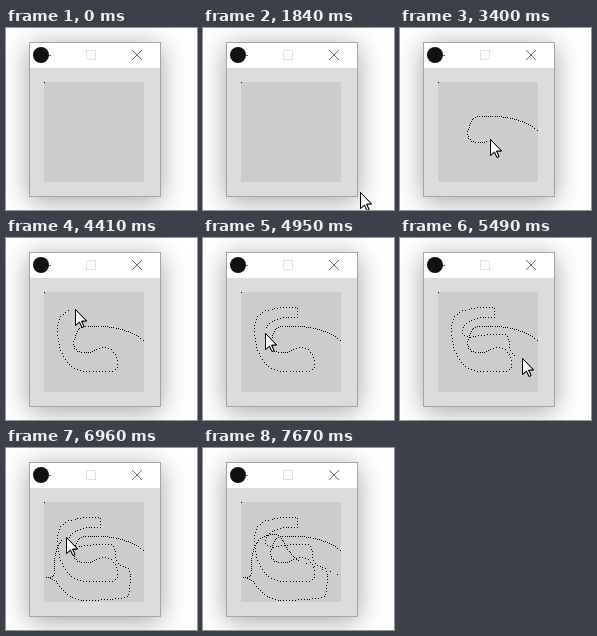
Recreate the animation shown at these times as an HTML page with a canvas. Size 191 px wide and 182 px high, loop 8.91 s.

```html
<!DOCTYPE html>
<html lang="en">
<head>
<meta charset="utf-8">
<title>Mouse trail</title>
<style>
html, body { margin: 0; width: 100%; height: 100%; overflow: hidden; background: #fff; }
canvas { display: block; }
</style>
</head>
<body>
<canvas id="stage" width="191" height="182"></canvas>
<script>
const LOOP = 8910, START = 1840, END = 7670, STEPS = 75;
const STEP = (END - START) / STEPS;
const DOT_GAP = 21 / STEP; // steps between dots
const LAG = 2 * DOT_GAP;

// Hand movement: each leg is followed at even speed up to its last step
const legs = [
  [7, 'M157 164C156 140 151 110 130 97'],
  [20, 'M130 97Q112 88 93 88H80Q71 88 70 96Q66 104 68 109Q70 114 78 114Q87 114 90 111'],
  [33, 'M90 111Q97 107 103 110Q112 116 111 127Q110 133 103 133H80Q66 133 58 120Q51 108 51 90Q51 73 69 71'],
  [47, 'M69 71Q76 69 82 69H94V79H83Q70 80 64 87Q57 97 70 99Q88 95 104 96Q110 98 109 108Q110 117 122 120'],
  [57, 'M122 120Q125 125 124 134L122 146Q121 150 112 150Q95 152 75 152Q58 148 50 133'],
  [71, 'M50 133Q46 129 39 129H45Q49 128 48 118Q48 100 56 91Q64 85 74 86Q78 88 81 95Q86 105 94 112'],
  [74, 'M94 112Q125 122 180 144']
].map(([end, d], i, all) => {
  const path = document.createElementNS('http://www.w3.org/2000/svg', 'path');
  path.setAttribute('d', d);
  return { path, end, start: i ? all[i - 1][0] : 0, length: path.getTotalLength() };
});

const ctx = document.getElementById('stage').getContext('2d');

function pointer(step) {
  const leg = legs.find(l => step <= l.end) || legs[legs.length - 1];
  const part = (step - leg.start) / (leg.end - leg.start);
  const p = leg.path.getPointAtLength(part * leg.length);
  return [Math.round(p.x), Math.round(p.y)];
}

const dots = [];
for (let step = 0; step <= 74; step += DOT_GAP) {
  const [x, y] = pointer(step);
  if (x >= 38 && x < 138 && y >= 54 && y < 154) dots.push({ step, x, y });
}

function box(color, x, y, w, h) {
  ctx.fillStyle = color;
  ctx.fillRect(x, y, w, h);
}

function line(color, points, close) {
  ctx.beginPath();
  points.forEach(([x, y]) => ctx.lineTo(x, y));
  if (close) ctx.closePath();
  ctx.strokeStyle = color;
  ctx.lineWidth = 1;
  ctx.stroke();
}

function drawWindow() {
  box('#fff', 0, 0, 191, 182);
  ctx.save();
  ctx.shadowColor = 'rgba(0,0,0,.36)';
  ctx.shadowBlur = 25;
  ctx.shadowOffsetY = 4;
  box('#a5a5a5', 23, 14, 132, 155);
  ctx.restore();
  box('#fff', 24, 15, 130, 25);
  box('#dcdcdc', 24, 40, 130, 128);
  box('#ccc', 38, 54, 100, 100);

  ctx.beginPath();
  ctx.arc(35, 27, 8, 0, Math.PI * 2);
  ctx.fillStyle = '#111';
  ctx.fill();
  box('#666', 43, 27, 2, 1);

  ctx.strokeStyle = '#e0e0e0';
  ctx.lineWidth = 1;
  ctx.strokeRect(80.5, 22.5, 9, 9);
  line('#707070', [[126, 22], [136, 32]]);
  line('#707070', [[136, 22], [126, 32]]);
}

function drawTrail(step) {
  box('#000', 38, 54, 1, 1);
  for (const dot of dots) {
    if (dot.step <= step - LAG) box('#000', dot.x, dot.y, 1, 1);
  }
}

function drawPointer(step) {
  const [x, y] = pointer(step);
  const arrow = [[0, 0], [0, 16], [4, 12.5], [6.5, 18], [8.5, 17], [6, 11.5], [11, 11.5]];
  ctx.save();
  ctx.translate(x + .5, y + .5);
  line('#000', arrow, true);
  ctx.fillStyle = '#fff';
  ctx.fill();
  line('#000', arrow, true);
  ctx.restore();
}

function draw(t) {
  const step = Math.floor((t - START) / STEP + .1);
  drawWindow();
  drawTrail(step);
  if (t >= START && step < STEPS) drawPointer(step);
}

const begin = performance.now();
function tick() {
  draw((performance.now() - begin) % LOOP);
  requestAnimationFrame(tick);
}
tick();
</script>
</body>
</html>
```
